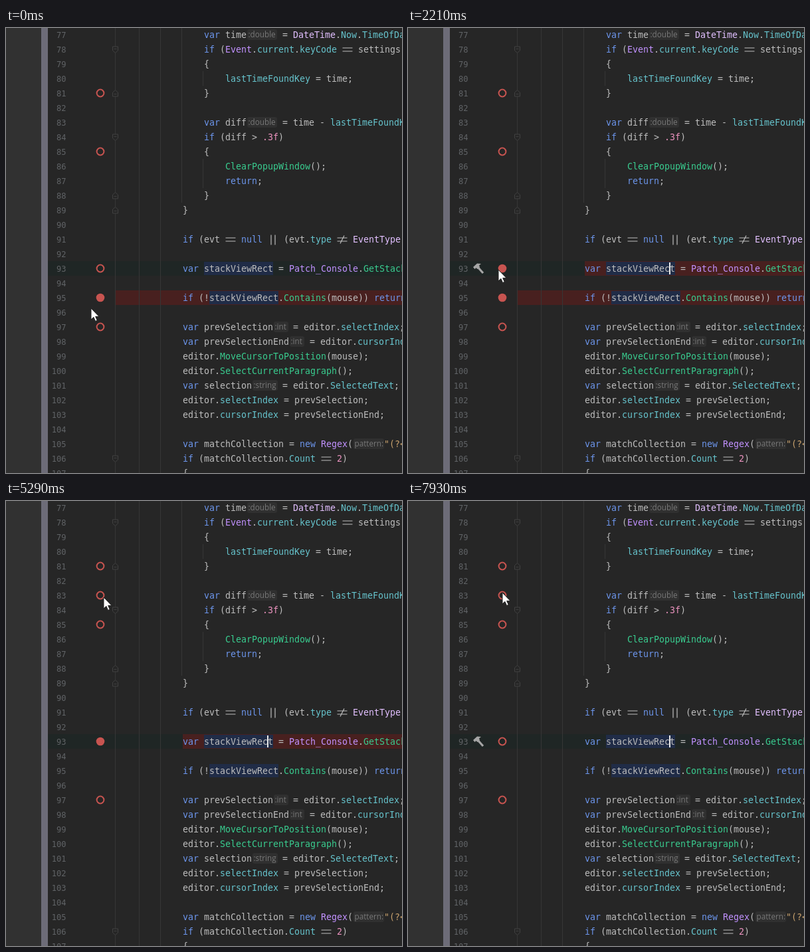
An HTML page that plays this animation: 596x670 px, repeating every 8000 ms.

```html
<!DOCTYPE html>
<html lang="en">
<head>
<meta charset="utf-8">
<title>Breakpoints in the gutter</title>
<style>
html, body { margin: 0; width: 100%; height: 100%; overflow: hidden; background: #262626; }
svg { display: block; }
text { white-space: pre; }
.code text { font: 13.29px "DejaVu Sans Mono", monospace; }
.code .num { font-size: 12.1px; fill: #606366; text-anchor: end; }
.code .hint { font: 11.7px "Open Sans", sans-serif; fill: #787878; }
.lig { fill: none; stroke: #bdbdbd; stroke-width: 1.2; }
.guides { fill: none; stroke: #363636; }
.fold { fill: #262626; stroke: #404040; }
.hollow { fill: none; stroke: #c75450; stroke-width: 2; }
.solid { fill: #c75450; }
.red { fill: #48201f; }
.blue { fill: #202c47; }
.menu text { font: 11.3px "Open Sans", sans-serif; fill: #c8c8c8; }
#pointer path { fill: #fff; stroke: #222; stroke-width: 1; stroke-linejoin: round; }
</style>
</head>
<body>
<svg id="stage" width="596" height="670" viewBox="0 0 596 670">
  <rect width="596" height="670" fill="#262626"/>
  <rect width="53" height="670" fill="#313131"/>
  <rect x="53" width="10" height="670" fill="#6d6c78"/>
  <rect x="63" y="351" width="533" height="22" fill="#1f2625"/>
  <rect class="red" data-show="on83" x="164" y="131" width="432" height="22"/>
  <rect class="red" data-show="on93" x="266" y="351" width="330" height="22"/>
  <rect class="red" data-show="on95" x="164" y="395" width="432" height="22"/>
  <rect class="blue" x="298" y="352" width="104" height="20"/>
  <rect class="blue" x="306" y="396" width="104" height="20"/>
  <path class="guides" d="M164.5 0V670M200.5 0V670M232.5 0V670M264.5 0V263M296.5 65V87M296.5 197V241"/>
  <g id="folds"></g>
  <g id="code" class="code"></g>
  <rect data-show="caret" x="393" y="353" width="2" height="18" fill="#e8e8e8"/>

  <g id="gutter"></g>
  <circle class="hollow" data-show="ring83" cx="142" cy="142" r="5.4"/>
  <circle class="solid" data-show="on83" cx="142" cy="142" r="6.3"/>
  <circle class="hollow" data-show="ring93" cx="142" cy="362" r="5.4"/>
  <circle class="solid" data-show="on93" cx="142" cy="362" r="6.3"/>
  <circle class="solid" data-show="dot95" cx="142" cy="406" r="6.3"/>
  <circle class="solid" data-show="split95" cx="125" cy="406" r="6.3"/>
  <g data-show="plus95">
    <circle class="solid" cx="142" cy="406" r="6.3"/>
    <path d="M138.5 406h7M142 402.5v7" stroke="#262626" stroke-width="2"/>
  </g>
  <g data-show="hammer">
    <path d="M105 360L113 369" stroke="#a6a6a6" stroke-width="3.2"/>
    <path d="M98 360L104 354.5L110 355L107 357.5L108 360L104.5 363L102.5 361L100.5 363Z" fill="#a6a6a6"/>
  </g>

  <g class="menu" data-show="menu">
    <rect x="169.5" y="416.5" width="275" height="122" fill="#2d2e2f" stroke="#4b4c4d"/>
    <rect x="170" y="417" width="274" height="27" fill="#393a3b"/>
    <rect x="170" y="445" width="274" height="20" fill="#345089"/>
    <rect x="170" y="514" width="274" height="24" fill="#373839"/>
    <text x="309" y="433" text-anchor="middle">Set Breakpoint</text>
    <text x="200" y="459" style="fill:#eee">if (!stackViewRect.Contains(mouse))</text>
    <text x="200" y="479">return;</text>
    <text x="200" y="499">All</text>
    <text x="180" y="530" style="fill:#929292">Choose an item with Ctrl+F8</text>
    <circle class="solid" cx="188" cy="454.500" r="5.5"/>
    <circle class="solid" cx="188" cy="474.500" r="5.5"/>
    <circle class="solid" cx="190.500" cy="492" r="3.6"/>
    <circle class="solid" cx="186" cy="496.500" r="4.3" stroke="#2d2e2f"/>
  </g>

  <g id="pointer">
    <path data-show="arrow" d="M0 0V17L3.9 13.400L6.600 19.500L9.300 18.300L6.700 12.400H12Z"/>
    <path data-show="hand" d="M-1.500 4Q-1.500 2 .2 2Q2 2 2 4V9Q4 7.600 5.200 9.500Q7 8.300 8 10.200Q10.300 9.500 10.300 12.500V17L8.500 20V23H-.5V20L-4.500 14.500Q-5 12 -3 12L-1.500 13.500Z"/>
  </g>
</svg>
<script>
const LOOP = 8000;
const GREY = '#bdbdbd';
const byId = id => document.getElementById(id);
const rowY = line => 10 + 22 * (line - 77);

function add(parent, tag, attrs, content) {
  const node = document.createElementNS('http://www.w3.org/2000/svg', tag);
  for (const key in attrs) node.setAttribute(key, attrs[key]);
  if (content) node.textContent = content;
  return parent.appendChild(node);
}

// Code rows: line, then x and text; text at a null x is an inlay hint
const rows = [
  [77, 298, 'var time', null, ':double', 416, '= DateTime.Now.TimeOfDay'],
  [78, 298, 'if (Event.current.keyCode == settings'],
  [79, 298, '{'],
  [80, 330, 'lastTimeFoundKey = time;'],
  [81, 298, '}'],
  [83, 298, 'var diff', null, ':double', 416, '= time - lastTimeFoundKey'],
  [84, 298, 'if (diff > .3f)'],
  [85, 298, '{'],
  [86, 330, 'ClearPopupWindow();'],
  [87, 330, 'return;'],
  [88, 298, '}'],
  [89, 266, '}'],
  [91, 266, 'if (evt == null || (evt.type != EventType'],
  [93, 266, 'var stackViewRect = Patch_Console.GetStackView('],
  [95, 266, 'if (!stackViewRect.Contains(mouse)) return;'],
  [97, 266, 'var prevSelection', null, ':int', 432, '= editor.selectIndex;'],
  [98, 266, 'var prevSelectionEnd', null, ':int', 457, '= editor.cursorIndex;'],
  [99, 266, 'editor.MoveCursorToPosition(mouse);'],
  [100, 266, 'editor.SelectCurrentParagraph();'],
  [101, 266, 'var selection', null, ':string', 416, '= editor.SelectedText;'],
  [102, 266, 'editor.selectIndex = prevSelection;'],
  [103, 266, 'editor.cursorIndex = prevSelectionEnd;'],
  [105, 266, 'var matchCollection = new Regex(', null, 'pattern:', 569, '"(?<'],
  [106, 266, 'if (matchCollection.Count == 2)'],
  [107, 266, '{']
];
const hintWidth = { ':double': 45, ':int': 22, ':string': 38, 'pattern:': 46 };
const ligatures = {
  '==': 'M.5 -2.500H15.500M.5 2.500H15.500',
  '!=': 'M.5 -2.500H15.500M.5 2.500H15.500M11 -6L5 6',
  '||': 'M5 -7V8M11 -7V8'
};
const palette = [
  [/^(var|if|null|new|return)$/, '#6c95eb'],
  [/^(Event|Patch_Console|Regex)$/, '#c191ff'],
  [/^(DateTime|EventType)$/, '#e1bfff'],
  [/^(Now|TimeOfDay|current|keyCode|lastTimeFoundKey|type|selectIndex|cursorIndex|SelectedText|Count)$/, '#66c3cc'],
  [/^\.?\d/, '#ed94c0'],
  [/^"/, '#c9a26d']
];

function colorOf(token, next) {
  const rule = palette.find(([pattern]) => pattern.test(token));
  if (rule) return rule[1];
  return /^[A-Z]/.test(token) && next === '(' ? '#39cc8f' : GREY;
}

function drawCode(x, y, source) {
  for (const match of source.matchAll(/".*|\.\d\w*|==|!=|\|\||\w+|[^\w\s]/g)) {
    const token = match[0], left = x + match.index * 8;
    if (ligatures[token]) {
      add(byId('code'), 'path', { class: 'lig', d: ligatures[token], transform: `translate(${left} ${y + .5})` });
    } else {
      const fill = colorOf(token, source[match.index + token.length]);
      add(byId('code'), 'text', { x: left, y: y + 4.7, fill }, token);
    }
  }
}

function drawHint(x, y, label) {
  add(byId('code'), 'rect', { x, y: y - 8, width: hintWidth[label], height: 16, rx: 3, fill: '#303030' });
  add(byId('code'), 'text', { x: x + 1.5, y: y + 4, class: 'hint' }, label);
}

for (let line = 77; line <= 107; line++) {
  add(byId('code'), 'text', { x: 90.5, y: rowY(line) + 4.7, class: 'num' }, String(line));
}
for (const [line, ...parts] of rows) {
  let end = 0;
  for (let i = 0; i < parts.length; i += 2) {
    const [x, content] = [parts[i], parts[i + 1]];
    if (x === null) drawHint(end + 1, rowY(line), content);
    else {
      drawCode(x, rowY(line), content);
      end = x + content.length * 8;
    }
  }
}
for (const line of [81, 85, 97]) {
  add(byId('gutter'), 'circle', { class: 'hollow', cx: 142, cy: rowY(line), r: 5.4 });
}
for (const [line, flip] of [[78, 1], [84, 1], [106, 1], [81, -1], [88, -1], [89, -1]]) {
  add(byId('folds'), 'path', {
    class: 'fold', d: 'M-4 -4.500H4V1.500L0 5L-4 1.500ZM-2 -1H2',
    transform: `translate(164.5 ${rowY(line) + .5}) scale(1 ${flip})`
  });
}

// Visible spans in ms
const spans = {
  menu: [[350, 1250]],
  hand: [[350, 1250], [2700, 3080]],
  arrow: [[0, 350], [1250, 2700], [3080, LOOP]],
  caret: [[1250, LOOP]],
  hammer: [[2120, 4560], [5550, LOOP]],
  on83: [[5450, 7650]],
  ring83: [[3480, 5450], [7650, LOOP]],
  on93: [[2000, 6500]],
  ring93: [[0, 2000], [6500, LOOP]],
  on95: [[0, 3450]],
  dot95: [[0, 350], [1250, 2700]],
  split95: [[350, 1250], [2700, 3450]],
  plus95: [[350, 1250], [2700, 4560]]
};
// Pointer stops: ms, x, y
const stops = [
  [0, 128, 422], [70, 128, 422], [350, 145, 408], [1250, 145, 408], [1650, 136, 366],
  [2210, 136, 364], [2450, 136, 364], [2720, 145, 408], [3050, 145, 408], [3300, 126, 403],
  [3480, 126, 403], [3750, 154, 408], [4100, 154, 408], [4750, 147, 145], [5750, 147, 145],
  [6250, 142, 354], [6600, 142, 354], [7100, 144, 108], [7420, 142, 138], [LOOP, 142, 138]
];
const stopAt = (ms, rule) => `${ms / LOOP * 100}%{${rule}}`;
let css = '';
for (const name in spans) {
  const steps = spans[name].map(([from, to]) =>
    stopAt(from, 'visibility:visible') + stopAt(to, `visibility:${to === LOOP ? 'visible' : 'hidden'}`));
  css += `@keyframes ${name}{${stopAt(0, 'visibility:hidden')}${steps.join('')}${
    spans[name].at(-1)[1] < LOOP ? stopAt(LOOP, 'visibility:hidden') : ''}}
    [data-show=${name}]{animation:${name} ${LOOP}ms step-end infinite}`;
}
css += `@keyframes travel{${stops.map(([ms, x, y]) => stopAt(ms, `transform:translate(${x}px,${y}px)`)).join('')}}
  #pointer{animation:travel ${LOOP}ms ease-in-out infinite}`;
document.head.appendChild(document.createElement('style')).textContent = css;
</script>
</body>
</html>
```
